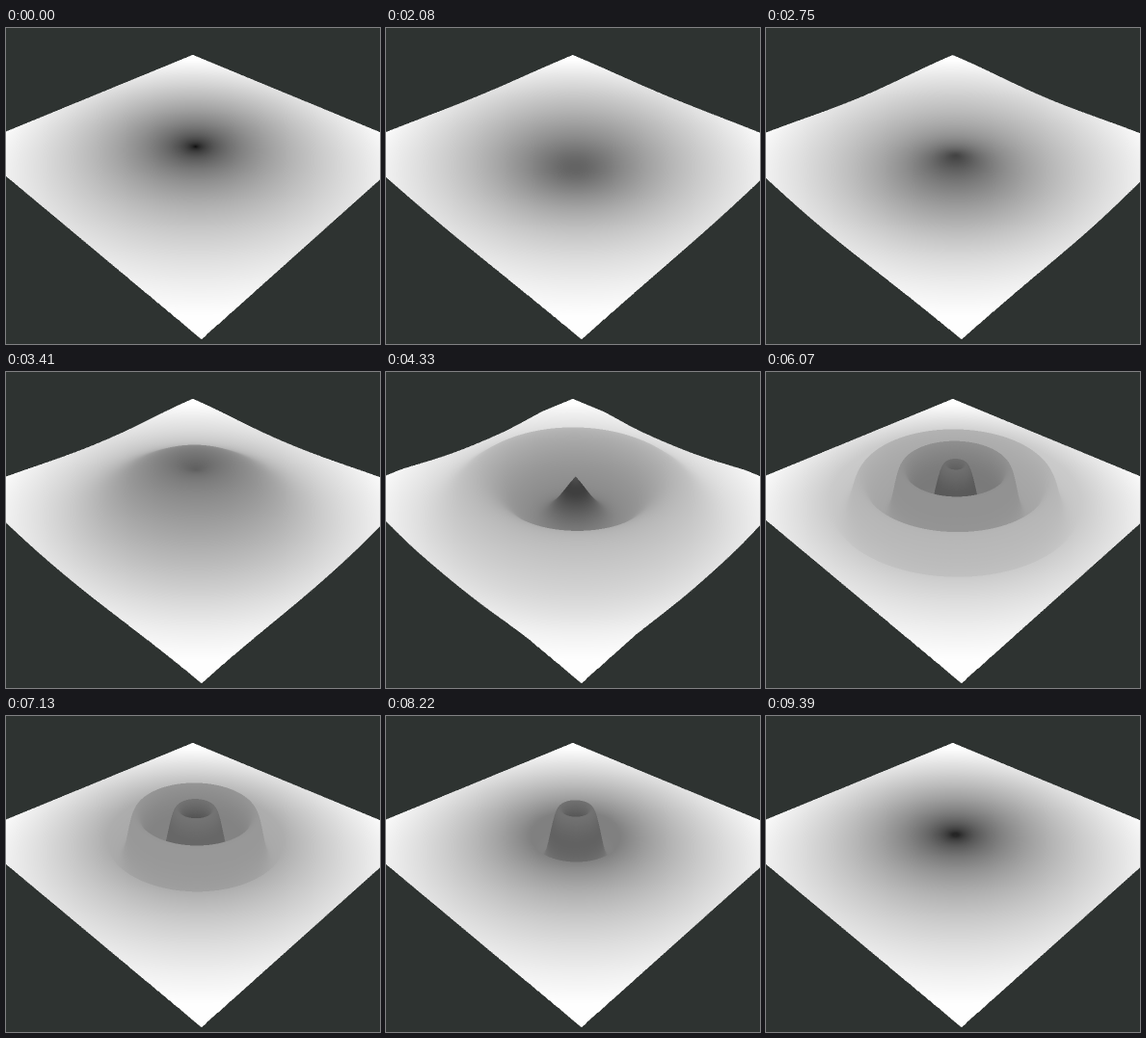
These frames come from a looping animation (388 px wide and 328 px high, 9480 ms). An HTML page with a canvas:

```html
<!DOCTYPE html>
<html lang="en">
<head>
<meta charset="utf-8">
<title>Radial wave</title>
<style>
html, body { margin: 0; width: 100%; height: 100%; overflow: hidden; background: #2e3331; }
canvas { display: block; }
</style>
</head>
<body>
<canvas id="stage" width="388" height="328"></canvas>
<script>
const W = 388, H = 328, SS = 2;
const LOOP = 9480, FRAMES = 114, STEP = LOOP / FRAMES;

// Camera: focal length, distance, pitch and offsets (half diagonal of the sheet is about 1)
const FOCAL = 510.9, DIST = 2.2165, COS = 0.784, SIN = 0.6208;
const UP = 0.1779, RIGHT = 0.0117, SKEW = 0.0131, ROLL = 0.024;
const SIZE = 1.003;

// Wave: a sine train whose outer end closes in on the centre while it gets finer
const AMP = 0.136, REACH = 0.6, SPEED = 0.164;
const WAVES = 35, EASE_START = 0.8, EASE_TIME = 5.35, EASE_POWER = 2.6;

const stage = document.getElementById("stage").getContext("2d");
const big = document.createElement("canvas");
big.width = W * SS;
big.height = H * SS;
const bigCtx = big.getContext("2d");
const image = bigCtx.createImageData(big.width, big.height);
const pixels = new Uint32Array(image.data.buffer);
const BACK = 0xff31332e;

const RES = 1000;
const heights = new Float32Array(RES * 1.6);
const shades = new Uint32Array(RES * 1.6);
for (let i = 0; i < shades.length; i++) {
  const g = Math.round(254 * Math.min(1, Math.pow(i / RES / 0.92, 0.45)));
  shades[i] = (0xff000000 | g << 16 | g << 8 | g) >>> 0;
}

function shapeWave(t) {
  const ease = Math.max(0, Math.min(1, (t - EASE_START) / EASE_TIME)) ** EASE_POWER;
  const waves = WAVES * ease;
  const end = SPEED * (LOOP / 1000 - t);
  for (let i = 0; i < heights.length; i++) {
    const r = i / RES;
    const fade = Math.exp(-((r / REACH) ** 2.5));
    heights[i] = -AMP * fade * Math.sin(waves * Math.max(0, end - r));
  }
}

// Each column is scanned from front to back; only rows above the last horizon are filled.
function scanColumn(col) {
  const x = ((col + 0.5) / SS - W / 2) / FOCAL;
  const tilt = 1 - x * ROLL;
  let horizon = -1, z = 0;
  for (let s = SIZE; s >= -SIZE; s -= 1 / 600) {
    const p = (x * (DIST - s * COS - z * SIN) - RIGHT - SKEW * s) / tilt;
    if (Math.abs(p) + Math.abs(s) > SIZE) continue;
    const r = Math.sqrt(p * p + s * s);
    const at = r * RES, i = at | 0;
    z = heights[i] + (heights[i + 1] - heights[i]) * (at - i);
    const depth = DIST - s * COS - z * SIN + ROLL * p;
    const y = (H / 2 - FOCAL * (UP - s * SIN + z * COS) / depth) * SS;
    const row = Math.max(0, Math.round(y));
    if (horizon < 0) horizon = Math.min(big.height, row + 1);
    if (row >= horizon) continue;
    const shade = shades[Math.sqrt(r * r + z * z) * RES | 0];
    while (horizon > row) pixels[--horizon * big.width + col] = shade;
  }
}

function draw(t) {
  shapeWave(t);
  pixels.fill(BACK);
  for (let col = 0; col < big.width; col++) scanColumn(col);
  bigCtx.putImageData(image, 0, 0);
  stage.drawImage(big, 0, 0, W, H);
}

let shown = -1;
const start = performance.now();
function tick() {
  const ms = Math.max(0, performance.now() - start) % LOOP;
  const frame = Math.min(FRAMES - 1, Math.floor((ms + 14) / STEP));
  if (frame !== shown) {
    shown = frame;
    draw(frame * STEP / 1000);
  }
  requestAnimationFrame(tick);
}
tick();
</script>
</body>
</html>
```
